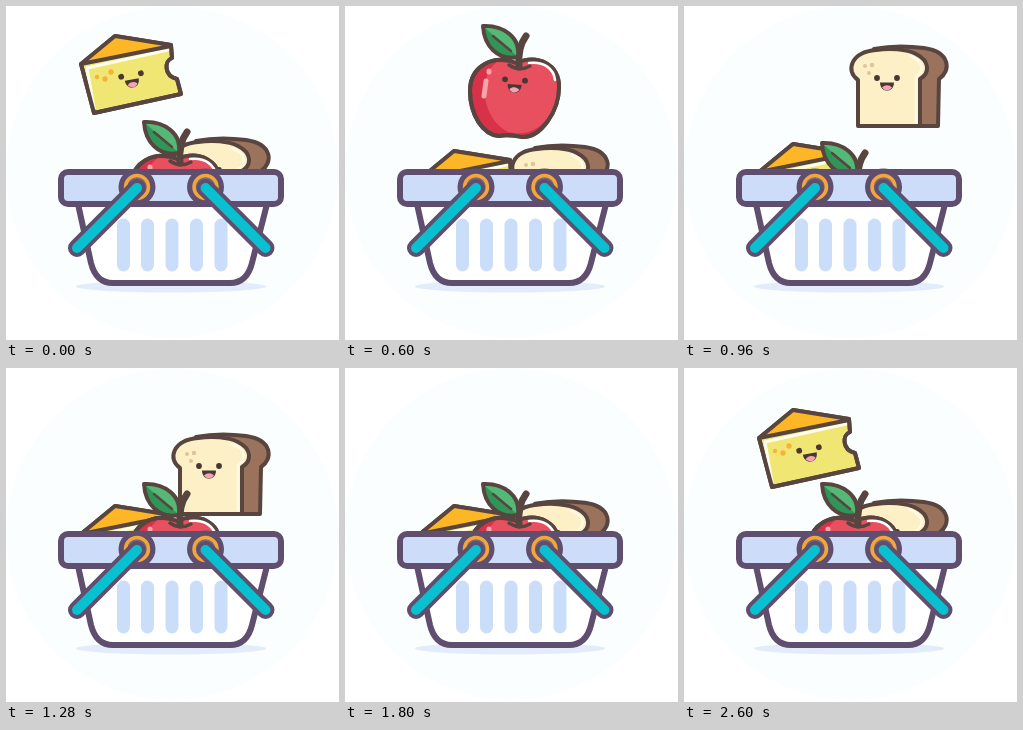
Animation, 333 px wide and 334 px high, one loop 2640 ms. Source, as an HTML page:

```html
<!DOCTYPE html>
<html lang="en">
<head>
<meta charset="utf-8">
<title>Grocery basket</title>
<style>
  html, body { margin: 0; height: 100%; overflow: hidden; background: #fff; }
  svg { display: block; width: 333px; height: 334px; }
  .food { stroke: #58453f; stroke-width: 4; stroke-linejoin: round; stroke-linecap: round; }
  .plain { stroke: none; }
  .line { fill: none; }
  .basket { stroke: #5f4e6d; stroke-width: 6; stroke-linejoin: round; }
</style>
</head>
<body>
<svg viewBox="0 0 333 334">
  <defs>
    <clipPath id="above"><path d="M0 0H333V174H0z"/></clipPath>
    <g id="face" class="plain">
      <circle cx="-10" r="2.900" fill="#493733"/>
      <circle cx="10" r="2.900" fill="#493733"/>
      <path d="M-7 4.500H7C7 15.500-7 15.500-7 4.500z" fill="#493733"/>
      <path d="M-5 9.500C-2 6.500 2 6.500 5 9.500C2 13.500-2 13.500-5 9.500z" fill="#f3a3b4"/>
    </g>
    <path id="peel" d="M171 153C148 144 125 156 125 181C125 205 138 225 154 226C162 224 171 226 177 227C196 228 214 201 214 177C214 154 193 144 171 153z"/>
    <g id="handle">
      <circle cx="131" cy="181" r="18.500" fill="#5f4e6d"/>
      <circle cx="131" cy="181" r="11.500" fill="#77677f" stroke="#f4a638" stroke-width="3.500"/>
      <path d="M131 182L71 242" stroke="#5f4e6d" stroke-width="18" stroke-linecap="round"/>
      <path d="M131 182L71 242" stroke="#08c0d0" stroke-width="10" stroke-linecap="round"/>
    </g>
  </defs>

  <circle cx="166" cy="166" r="166" fill="#fbfeff"/>
  <ellipse cx="165" cy="280.500" rx="95" ry="6" fill="#e3ecfb"/>

  <g id="foods" clip-path="url(#above)">
    <g id="cheese" class="food">
      <path d="M75 166L109 138L165 147L166 160C158 163 158 178 171 181L175 196L88 215z" fill="#f0e674"/>
      <path class="plain" d="M75 166L109 138L165 147z" fill="#fdb625"/>
      <path class="line" d="M88 210L81 170L162 152" style="stroke:#fffdf0;stroke-width:3"/>
      <path class="line" d="M75 166L109 138L165 147L166 160C158 163 158 178 171 181L175 196L88 215zL165 148"/>
      <g class="plain" fill="#f4b43c">
        <circle cx="91" cy="179" r="2.200"/><circle cx="99" cy="181" r="2.700"/><circle cx="105" cy="174" r="2.700"/>
      </g>
      <use href="#face" transform="translate(125 177) rotate(-10)"/>
    </g>

    <g id="bread" class="food">
      <path d="M190 135C205 132 225 132 240 134C267 138 267 157 255 165L254 212H180z" fill="#9b735c"/>
      <path d="M174 212V166C161 157 167 138 192 136C206 134 222 135 232 140C246 147 246 159 236 165V212z" fill="#fef0c6"/>
      <path class="line" d="M232 208V163C241 156 239 147 226 142" style="stroke:#fff9e6;stroke-width:2.500"/>
      <g class="plain" fill="#dfc59d">
        <circle cx="181" cy="152" r="2"/><circle cx="188" cy="151" r="2.300"/><circle cx="185" cy="159" r="2"/>
      </g>
      <use href="#face" transform="translate(203 164)"/>
    </g>

    <g id="apple" class="food">
      <use href="#peel" fill="#d8324a"/>
      <path class="plain" d="M152 152C134 164 134 206 163 222C195 230 213 200 213 177C213 154 193 144 171 153z" fill="#e9505f"/>
      <use href="#peel" fill="none"/>
      <path class="line" d="M141 171L139 186M144 161V162" style="stroke:#f6a5ab;stroke-width:5"/>
      <path class="line" d="M184 153C199 151 209 159 210 170" style="stroke:#fff;stroke-width:2.500"/>
      <path class="line" d="M164 155Q174 162 185 156" style="stroke-width:3.500"/>
      <path class="line" d="M174 157C173 145 175 134 181 126" style="stroke-width:7"/>
      <path d="M138 116C159 115 176 128 173 147C153 151 139 136 138 116z" fill="#2f9657"/>
      <path class="plain" d="M140 118C158 118 172 128 171 145z" fill="#56b877"/>
      <path class="line" d="M148 126L166 141" style="stroke-width:2.500"/>
      <use href="#face" transform="translate(170 170) rotate(4)"/>
    </g>
  </g>

  <g class="basket">
    <path d="M72 198L85 257Q90 277 107 277H224Q241 277 246 257L261 198z" fill="#fff"/>
    <path d="M117.500 219V259M141.500 219V259M166 219V259M190.500 219V259M215 219V259" style="stroke:#cbdef9;stroke-width:13;stroke-linecap:round"/>
    <rect x="55" y="166" width="220" height="32" rx="7" fill="#cdddf9"/>
  </g>
  <use href="#handle"/>
  <use href="#handle" transform="translate(330.500) scale(-1 1)"/>
</svg>

<script>
const LOOP = 2640;
const byId = id => document.getElementById(id);
const foods = byId('foods'), apple = byId('apple'), bread = byId('bread');

// Vertical offset from the resting place: [ms, px]
const jumps = {
  cheese: [[-480, 0], [-330, 22], [-40, -96], [0, -108], [280, -14], [370, 26], [600, 7], [720, 0]],
  apple: [[120, 0], [300, 20], [600, -96], [650, -107], [960, 21], [1020, 26], [1270, 0]],
  bread: [[540, 0], [700, 22], [960, -92], [1110, -108], [1280, -66], [1460, 26], [1840, 0]]
};

const slope = (a, b) => (b[1] - a[1]) / (b[0] - a[0]);

// Tangent that is flat at turning points and never overshoots
function tangent(keys, i) {
  if (!i || i === keys.length - 1) return 0;
  const before = slope(keys[i - 1], keys[i]), after = slope(keys[i], keys[i + 1]);
  return before * after > 0 ? 2 * before * after / (before + after) : 0;
}

function offsetAt(keys, time) {
  const t = time > keys[0][0] + LOOP ? time - LOOP : time;
  const i = keys.findIndex((key, n) => n + 1 < keys.length && t >= key[0] && t < keys[n + 1][0]);
  if (i < 0) return 0;
  const [t0, y0] = keys[i], [t1, y1] = keys[i + 1];
  const span = t1 - t0, u = (t - t0) / span, v = 1 - u;
  return y0 * v * v * (1 + 2 * u) + y1 * u * u * (3 - 2 * u)
    + span * u * v * (tangent(keys, i) * v - tangent(keys, i + 1) * u);
}

function draw(now) {
  const time = Math.floor(now % LOOP / 40) * 40;
  for (const name in jumps) {
    byId(name).setAttribute('transform', `translate(0 ${offsetAt(jumps[name], time).toFixed(2)})`);
  }
  // The apple slips behind the bread while it crouches
  const front = time > 200 && time < 440 ? bread : apple;
  if (foods.lastElementChild !== front) foods.append(front);
}

const start = performance.now();
function tick() {
  draw(performance.now() - start);
  requestAnimationFrame(tick);
}
tick();
</script>
</body>
</html>
```
